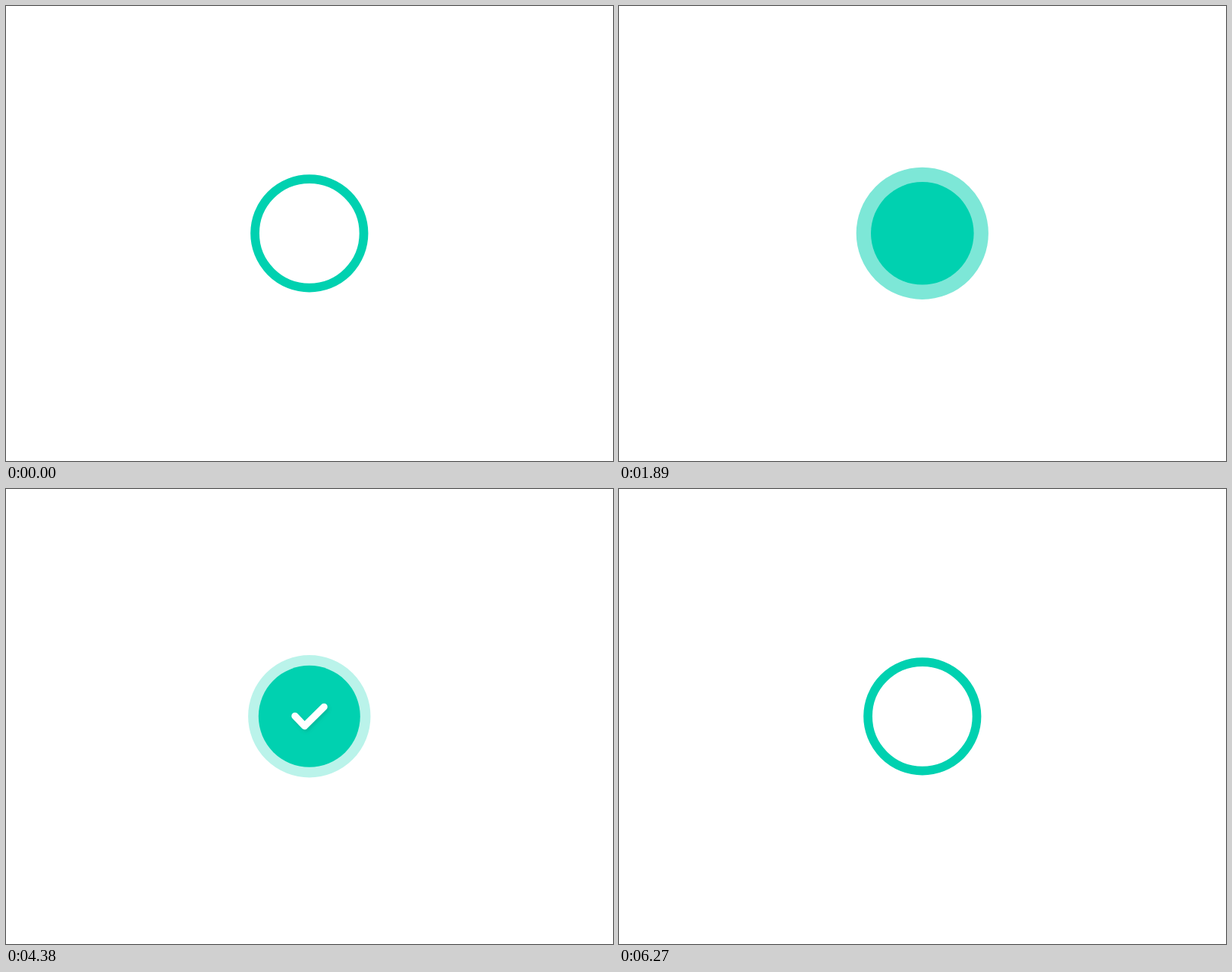
An HTML page for the animation above (6.3 s loop, 800 by 600 pixels).

```html
<!DOCTYPE html>
<html lang="en">
<head>
<meta charset="utf-8">
<title>Success check</title>
<style>
  html, body { margin: 0; width: 100%; height: 100%; overflow: hidden; background: #fff; }
  svg { display: block; width: 100%; height: 100%; }
</style>
</head>
<body>
<svg viewBox="0 0 800 600">
  <defs>
    <filter id="shadow" x="-40%" y="-40%" width="190%" height="190%">
      <feDropShadow dx="2" dy="3" stdDeviation="2.5" flood-color="#006b58" flood-opacity=".22"/>
    </filter>
    <mask id="reveal" maskUnits="userSpaceOnUse" x="360" y="270" width="80" height="60">
      <path id="wipe" d="M374 294.6L393 313.8L427 280" fill="none" stroke="#fff" stroke-width="15"
        pathLength="100"/>
    </mask>
  </defs>
  <circle id="halo" cx="399.8" cy="299.8" fill="none" stroke="#00d1b0"/>
  <circle id="ring" cx="399.8" cy="299.8" fill="none"/>
  <circle id="disc" cx="399.8" cy="299.8" fill="#00d1b0"/>
  <g id="check" filter="url(#shadow)">
    <g mask="url(#reveal)">
      <path d="M379 299.2L393 313.8L421 286" fill="none" stroke="#fff" stroke-width="10"
        stroke-linecap="round" stroke-linejoin="round"/>
    </g>
  </g>
</svg>
<script>
const LOOP = 6300, STEP = 30;
const [halo, ring, disc, check, wipe] =
  ['halo', 'ring', 'disc', 'check', 'wipe'].map(id => document.getElementById(id));

const smooth = u => (1 - Math.cos(Math.PI * u)) / 2;
const settle = u => 1 - (1 + 10 * u) * Math.exp(-10 * u);

// Keys are [time, value, easing towards this key].
function track(...keys) {
  return t => {
    const i = keys.findIndex(key => t < key[0]);
    if (i < 0) return keys[keys.length - 1][1];
    if (i === 0) return keys[0][1];
    const [t0, v0] = keys[i - 1];
    const [t1, v1, ease = smooth] = keys[i];
    return v0 + (v1 - v0) * ease((t - t0) / (t1 - t0));
  };
}

const haloRadius = track([690, 77.6], [1560, 93.4], [2000, 86], [4300, 86], [4800, 0]);
const haloWidth = track([1540, 0.151], [2050, 0.45]);
const haloAlpha = track([1560, 1], [2100, 0.27]);
const ringRadius = track([4560, 0], [5080, 82.6], [6060, 77.6, settle]);
const ringWidth = track([4890, 0.171], [5300, 0.151]);
const ringTint = track([4890, 1], [5300, 0]);
const discRadius = track([900, 0], [1620, 67.8], [2520, 67.8], [2900, 72],
  [4100, 69.7, settle], [4300, 69.7], [4935, 0]);
const checkDrawn = track([2160, 0], [2730, 100]);
const checkScale = track([4300, 1], [4720, 0]);

function setAttributes(node, values) {
  for (const name in values) node.setAttribute(name, values[name]);
}

function setHoop(node, radius, share) {
  const width = radius * share;
  setAttributes(node, {
    r: radius - width / 2,
    'stroke-width': width,
    visibility: radius > 0.01 ? 'visible' : 'hidden'
  });
}

function draw(t) {
  setHoop(halo, haloRadius(t), haloWidth(t));
  halo.setAttribute('stroke-opacity', haloAlpha(t));

  setHoop(ring, ringRadius(t), ringWidth(t));
  const tint = ringTint(t);
  ring.setAttribute('stroke', `rgb(0,${Math.round(209 + 8 * tint)},${Math.round(176 + 14 * tint)})`);

  disc.setAttribute('r', discRadius(t));

  const drawn = checkDrawn(t), scale = checkScale(t);
  wipe.setAttribute('stroke-dasharray', `${drawn} 200`);
  setAttributes(check, {
    transform: `translate(399.8 299.8) scale(${scale}) translate(-399.8 -299.8)`,
    visibility: drawn > 0 && scale > 0.01 ? 'visible' : 'hidden'
  });
}

const start = performance.now();
function tick() {
  const t = (performance.now() - start) % LOOP;
  draw(Math.floor(t / STEP) * STEP);
  requestAnimationFrame(tick);
}
tick();
</script>
</body>
</html>
```
